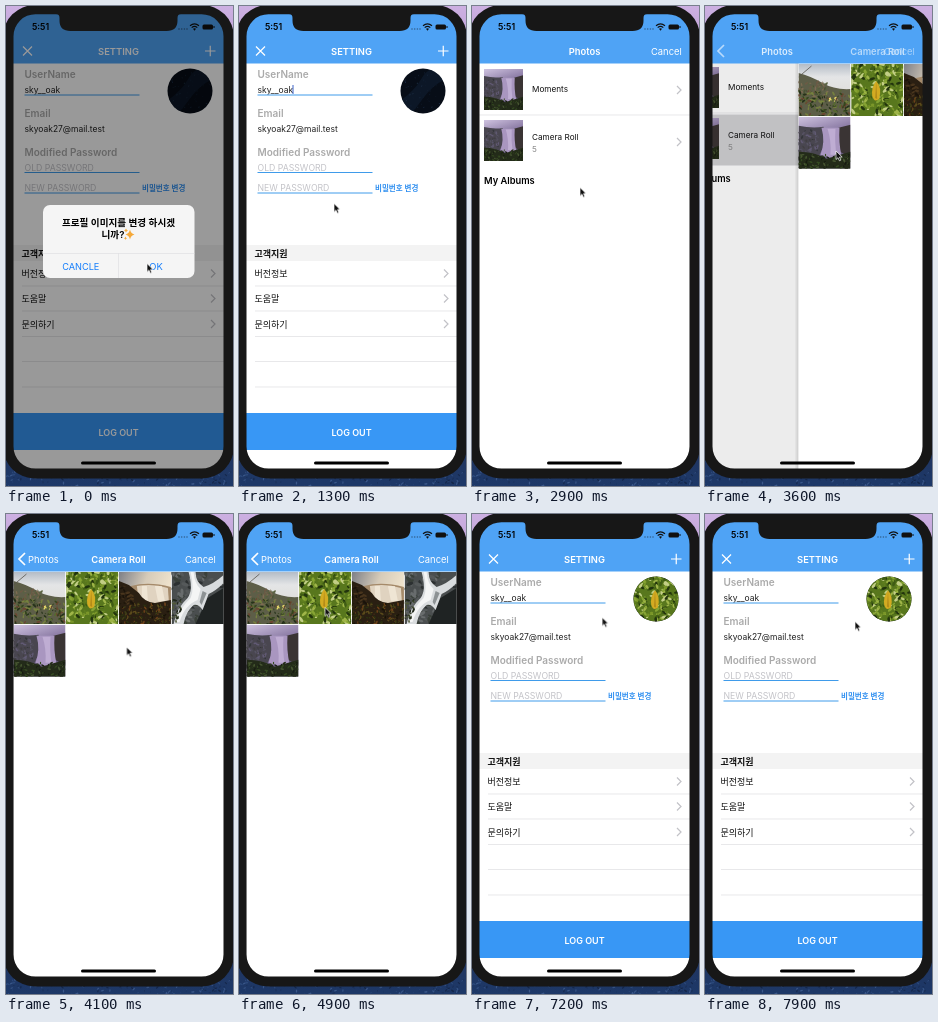
An HTML page for the animation above (8000 ms loop, 227x480 px).

```html
<!DOCTYPE html>
<html lang="ko">
<head>
<meta charset="utf-8">
<title>Profile settings</title>
<style>
  html, body { margin: 0; width: 100%; height: 100%; overflow: hidden; background: #1b315c; }
  svg { display: block; }
  text { font: 400 9px Inter, "Noto Sans CJK KR", "Noto Sans CJK", sans-serif; dominant-baseline: central; }
  .mid { text-anchor: middle; }
  .bold { font-weight: 600; }
  .nav text { fill: #fff; font-size: 9.4px; }
  .label { font-size: 10px; font-weight: 600; fill: #aaa; }
  .field { font-size: 8.5px; fill: #222; }
  .hint { font-size: 8.7px; fill: #c3c3c8; }
  .row { font-size: 9px; fill: #111; }
  .item { font-size: 8.2px; fill: #111; }
  .line { stroke: #3f9bea; stroke-width: 1; }
  .rule { stroke: #d9d9dc; stroke-width: .6; }
  .chev { fill: none; stroke: #c2c2c7; stroke-width: 1.2; }
  .icon { fill: none; stroke: #fff; stroke-width: 1.2; }
</style>
</head>
<body>
<svg id="stage" width="227" height="480" viewBox="0 0 227 480">
  <defs>
    <linearGradient id="wall" x2="0" y2="1">
      <stop offset="0" stop-color="#cdb0e2"/><stop offset=".4" stop-color="#77689f"/>
      <stop offset=".9" stop-color="#22345c"/><stop offset="1" stop-color="#1d3868"/>
    </linearGradient>
    <linearGradient id="haze" x2="0" y2="1">
      <stop offset="0" stop-color="#b4bcc6"/><stop offset=".25" stop-color="#e4e5e6"/><stop offset="1" stop-color="#d8d5cc"/>
    </linearGradient>
    <linearGradient id="dusk" x2="1" y2=".4">
      <stop offset="0" stop-color="#7d7f86"/><stop offset=".5" stop-color="#d6cbb9"/><stop offset="1" stop-color="#f2e6cf"/>
    </linearGradient>
    <linearGradient id="violet" x2=".3" y2="1">
      <stop offset="0" stop-color="#cfc3e0"/><stop offset=".4" stop-color="#8f7fa8"/><stop offset="1" stop-color="#5a5070"/>
    </linearGradient>
    <linearGradient id="edge">
      <stop offset="0" stop-color="#000" stop-opacity="0"/><stop offset="1" stop-color="#000" stop-opacity=".14"/>
    </linearGradient>
    <clipPath id="inside"><rect x="3" y="4" width="219" height="463" rx="24"/></clipPath>
    <clipPath id="disc"><circle cx="184" cy="85" r="22.5"/></clipPath>
  </defs>

  <rect width="227" height="480" fill="url(#wall)"/>
  <g id="specks"></g>

  <g clip-path="url(#inside)">
    <rect width="227" height="480" fill="#fff"/>

    <!-- settings -->
    <g>
      <rect width="227" height="57.5" fill="#4fa3f5"/>
      <g class="nav">
        <text class="mid bold" x="112.5" y="45">SETTING</text>
        <path class="icon" d="M17 40.5l9 9m0-9l-9 9M199 45h10.5m-5.25-5.25v10.5"/>
      </g>
      <text class="label" x="18.5" y="68">UserName</text>
      <text class="field" x="18.5" y="84">sky__oak</text>
      <rect id="caret" x="53.5" y="79" width="1" height="9" fill="#3c62c8"/>
      <text class="label" x="18.5" y="106.5">Email</text>
      <text class="field" x="18.5" y="123">skyoak27@mail.test</text>
      <text class="label" x="18.5" y="145.5">Modified Password</text>
      <text class="hint" x="18.5" y="161.5">OLD PASSWORD</text>
      <text class="hint" x="18.5" y="182">NEW PASSWORD</text>
      <path class="line" d="M18.5 89H133.5M18.5 166.5H133.5M18.5 187H133.5"/>
      <text class="bold" x="136" y="182" fill="#2f8ff0" style="font-size:7.5px">비밀번호 변경</text>
      <g clip-path="url(#disc)">
        <use href="#night" transform="translate(161 62) scale(.89)"/>
        <use id="chosen" href="#leaves" transform="translate(159 60) scale(.96)"/>
      </g>

      <rect y="239" width="227" height="16" fill="#f3f3f3"/>
      <text class="row bold" x="15.5" y="247.5">고객지원</text>
      <text class="row" x="15.5" y="267.5">버전정보</text>
      <text class="row" x="15.5" y="292.5">도움말</text>
      <text class="row" x="15.5" y="318">문의하기</text>
      <path class="rule" d="M16 280H218M16 305H218M16 330.5H218M16 355.5H218M16 381H218"/>
      <path class="chev" d="M205 263.5l4 4-4 4M205 288.5l4 4-4 4M205 314l4 4-4 4"/>
      <rect y="407" width="227" height="37" fill="#3897f5"/>
      <text class="mid bold" x="112.5" y="426" fill="#fff">LOG OUT</text>
    </g>

    <!-- photo picker -->
    <g id="picker">
      <rect width="227" height="480" fill="#fff"/>
      <g id="list">
        <g id="rows">
          <rect id="pressed" y="110.5" width="227" height="51" fill="#d0d0d3"/>
          <use href="#violetfall" transform="translate(12 63) scale(.75 .79)"/>
          <use href="#violetfall" transform="translate(12 114) scale(.75 .79)"/>
          <text class="item" x="60" y="83.3">Moments</text>
          <text class="item" x="60" y="130.7">Camera Roll</text>
          <text class="item" x="60" y="142.5" style="fill:#888">5</text>
          <path class="rule" d="M0 109H227"/>
          <path class="chev" d="M205 80l4 4-4 4M205 132l4 4-4 4"/>
          <text class="bold" x="12" y="174.5" style="font-size:9.3px">My Albums</text>
        </g>
        <rect id="shade" y="57" width="260" height="423" fill="#000"/>
      </g>
      <g id="grid">
        <rect x="3.5" y="57" width="4" height="423" fill="url(#edge)"/>
        <rect x="7.5" y="57" width="220" height="423" fill="#fff"/>
        <use href="#hill" x="7.5" y="58"/>
        <use href="#leaves" x="60.2" y="58"/>
        <use href="#sunfall" x="112.9" y="58"/>
        <use href="#greyfall" x="165.6" y="58"/>
        <use href="#violetfall" x="7.5" y="110.7"/>
      </g>
      <rect width="227" height="57.5" fill="#4fa3f5"/>
      <g class="nav">
        <g id="photosTitle"><text class="mid bold" x="112.5" y="45.3">Photos</text></g>
        <g id="backLabel"><text x="22" y="45">Photos</text></g>
        <path id="backArrow" class="icon" style="stroke-width:1.7" d="M19 39l-6 6 6 6"/>
        <g id="rollTitle"><text class="mid bold" x="112.5" y="45">Camera Roll</text></g>
        <g id="cancel"><text x="179" y="45">Cancel</text></g>
      </g>
    </g>

    <!-- status bar -->
    <text class="bold" x="26" y="21" style="font-size:8.7px">5:51</text>
    <g fill="#111">
      <g opacity=".45"><circle cx="173" cy="23" r=".8"/><circle cx="175.7" cy="23" r=".8"/><circle cx="178.4" cy="23" r=".8"/><circle cx="181" cy="23" r=".8"/></g>
      <path fill="none" stroke="#111" stroke-width="1.2" d="M184 19.700q4.500-3.800 9 0M185.700 21.600q2.800-2.300 5.600 0"/>
      <path d="M187 22.800q1.500-1 3 0l-1.500 1.900z"/>
      <rect x="196.5" y="18.5" width="10.5" height="5" rx="1.5"/><rect x="207.5" y="20" width="1" height="2"/>
    </g>
    <rect x="75" y="455.5" width="75" height="3" rx="1.5"/>

    <!-- confirmation -->
    <g id="alert">
      <rect width="227" height="480" opacity=".4"/>
      <rect x="37" y="199" width="151.5" height="73" rx="7" fill="#f5f5f5"/>
      <text class="mid bold" x="112.5" y="216" style="font-size:9.6px">프로필 이미지를 변경 하시겠</text>
      <text class="bold" x="95.5" y="228.5" style="font-size:9.6px">니까?</text>
      <path fill="#f5a93a" d="M124 223.500q.7 4 4.500 5-3.800 1-4.500 5-.7-4-4.500-5 3.800-1 4.500-5M120 222.500q.4 1.700 2 2-1.600.4-2 2-.4-1.600-2-2 1.600-.3 2-2M119.500 230.500q.3 1.500 1.700 1.800-1.400.3-1.700 1.800-.3-1.500-1.700-1.800 1.400-.3 1.700-1.800"/>
      <path d="M37 247.5H188.5M112.5 247.5V272" stroke="#dcdcdf" stroke-width=".6"/>
      <g fill="#157efb" class="mid">
        <text x="74.8" y="260.5" style="font-size:9.2px">CANCLE</text>
        <text x="150" y="260.5" style="font-size:9.4px">OK</text>
      </g>
    </g>
  </g>

  <!-- phone body with the screen cut out -->
  <path id="body" fill="#171717" fill-rule="evenodd"/>
  <path fill="#171717" d="M50 8h125q-3.500 0-3.500 4v2.500q0 10.500-11 10.500h-96q-11 0-11-10.500v-2.500q0-4-3.500-4z"/>

  <g id="cursor"><path fill="#111" stroke="#fff" stroke-width=".7" d="M0 0v8.500l2-1.800 1.400 3.100 1.500-.7-1.400-3 2.700-.1z"/></g>
</svg>

<script>
const LOOP = 8000;
const $ = id => document.getElementById(id);

const roundRect = (x, y, w, h, r) =>
  `M${x + r} ${y}h${w - 2 * r}a${r} ${r} 0 0 1 ${r} ${r}v${h - 2 * r}a${r} ${r} 0 0 1 ${-r} ${r}` +
  `h${2 * r - w}a${r} ${r} 0 0 1 ${-r} ${-r}v${2 * r - h}a${r} ${r} 0 0 1 ${r} ${-r}z`;
$('body').setAttribute('d', roundRect(-3, -1, 231, 473.5, 32) + roundRect(7.5, 8.2, 210, 454.4, 22));

// Seeded scatter of small tilted ellipses inside a box.
function scatter(seed, count, colors, [x, y, w, h], size) {
  const rnd = () => (seed = seed * 16807 % 2147483647) / 2147483647;
  let out = '';
  for (let i = 0; i < count; i++) {
    const cx = x + rnd() * w, cy = y + rnd() * h, r = size * (.4 + rnd());
    const fill = colors[Math.floor(rnd() * colors.length)];
    out += `<ellipse rx="${r}" ry="${r * .45}" fill="${fill}" transform="translate(${cx} ${cy}) rotate(${rnd() * 180})"/>`;
  }
  return out;
}
const base = fill => `<rect width="52" height="52" fill="${fill}"/>`;
const shape = (fill, d, extra = '') => `<path fill="${fill}" d="${d}" ${extra}/>`;

const photos = {
  hill: base('url(#haze)') +
    shape('#5d5e48', 'M0 9Q12 12 24 19T52 25V52H0z') +
    scatter(11, 110, ['#6d5a45', '#4a5235', '#7d6b52', '#5b6340'], [0, 18, 30, 18], 1.5) +
    scatter(23, 150, ['#34451d', '#57692f', '#76803f', '#26321a', '#6b4632'], [0, 27, 52, 25], 1.7) +
    scatter(5, 8, ['#e6d86a'], [31, 33, 9, 5], 1.3) +
    '<path d="M0 13L13 2" stroke="#59564f" stroke-width=".8"/>',
  leaves: base('#58771d') +
    scatter(31, 260, ['#3f5c14', '#7b9729', '#9fb548', '#c3cf86', '#5f7e1f', '#22340d', '#86a433'], [0, 0, 52, 52], 2.5) +
    shape('#d3ab22', 'M25 17Q31 23 28 35Q23 39 21 32Q20 23 25 17z') +
    shape('#b38a18', 'M25 18L26 35 24 34z'),
  sunfall: base('url(#dusk)') +
    shape('#a58a6a', 'M12 14Q30 9 52 15V32H12z') +
    shape('#e0d3c0', 'M18 14Q34 11 49 16L50 30Q34 33 20 30z') +
    shape('#f5ecdd', 'M23 14h5l1 15h-6zM36 14h7l3 15h-7z', 'opacity=".7"') +
    shape('#2a1f12', 'M0 9L10 13 20 21Q25 30 36 31L52 28V52H0z') +
    scatter(47, 150, ['#171207', '#3d3d17', '#5b4b1c', '#6f431a', '#2b3211'], [0, 31, 52, 21], 1.4) +
    scatter(53, 30, ['#1b140b', '#49351d', '#3a2a17'], [0, 14, 15, 20], 1.8),
  greyfall: base('#4a4e4f') +
    scatter(61, 90, ['#2c3031', '#686c6d', '#3a403a', '#55595a'], [0, 0, 52, 52], 3) +
    shape('#1f2323', 'M36 26L52 16V52H24z') +
    shape('#d9dcde', 'M17 0h7Q24 10 32 15Q42 12 52 3V11Q44 19 37 22L31 38Q27 32 22 33Q14 40 12 52H2Q5 36 16 26Q22 18 17 0z') +
    shape('#f4f5f5', 'M19 0h3Q23 12 29 17L26 28Q13 33 8 50H5Q8 36 19 26Q23 17 19 0z') +
    shape('#8d9294', 'M31 19L35 21 30 33 28 30z') +
    scatter(67, 28, ['#39432a', '#20271a', '#515a38'], [0, 28, 9, 22], 1.8),
  violetfall: base('url(#violet)') +
    shape('#494650', 'M0 9Q14 12 25 10L27 26 20 40 0 42z') +
    shape('#3a3434', 'M52 8L40 11 40 34 52 41z') +
    shape('#a996c0', 'M23 11H41Q40 26 43 39Q32 44 22 38Q27 25 23 11z') +
    shape('#cbbbdd', 'M29 12h8q-1 14 1 26h-6q1-14-3-26z', 'opacity=".65"') +
    scatter(83, 60, ['#34363a', '#565363', '#413f42', '#615a74'], [0, 14, 20, 22], 1.6) +
    shape('#232b19', 'M0 35Q16 35 28 42L52 35V52H0z') +
    scatter(89, 100, ['#354a21', '#161b10', '#465531', '#262e1a'], [0, 38, 52, 14], 1.6),
  night: base('#070d17') +
    shape('#101f33', 'M-5 40Q15 28 24 12T52 0V12Q36 20 26 34T8 56z', 'opacity=".6"') +
    scatter(97, 70, ['#15253c', '#0f1d30', '#22354f'], [4, 4, 44, 44], .7)
};
const defs = document.querySelector('defs');
for (const id in photos) {
  defs.innerHTML += `<symbol id="${id}" width="52" height="52" viewBox="0 0 52 52">${photos[id]}</symbol>`;
}
$('specks').innerHTML = scatter(7, 220, ['#2c4a7c', '#15274a', '#3a5789', '#1a3059'], [0, 455, 227, 25], 1.3);

// Stops are [time, value, easing to the next stop]; the last value holds.
const played = [];
function play(id, prop, stops) {
  const last = stops[stops.length - 1];
  const frames = [...stops, [LOOP, last[1]]].map(([t, value, easing = 'linear']) =>
    ({ offset: t / LOOP, [prop]: value, easing }));
  const a = $(id).animate(frames, { duration: LOOP, fill: 'both' });
  a.pause();
  played.push(a);
}
const at = (x, y = 0) => `translate(${x}px, ${y}px)`;
const glide = 'ease-in-out', settle = 'cubic-bezier(.2,.65,.35,1)';

play('alert', 'opacity', [[0, 1], [300, 1], [600, 0]]);
play('caret', 'opacity', [[0, 0], [600, 0], [600, 1], [1500, 1], [1900, 0]]);
play('chosen', 'opacity', [[0, 0], [6600, 0], [6600, 1]]);
play('picker', 'transform', [[0, at(0, 472)], [1500, at(0, 472), settle], [2000, at(0)],
  [6700, at(0), settle], [7200, at(0, 472)]]);

// Navigation push into the album.
const push = (id, prop, from, mid, to) =>
  play(id, prop, [[0, from], [3470, from], [3600, mid, settle], [3950, to]]);
push('list', 'transform', at(0), at(-37), at(-63));
push('shade', 'opacity', 0, .075, .1);
push('grid', 'transform', at(215), at(86), at(0));
push('photosTitle', 'transform', at(0), at(-40.5), at(-75));
push('photosTitle', 'opacity', 1, .8, 0);
push('backLabel', 'transform', at(75), at(34.5), at(0));
push('backLabel', 'opacity', 0, 0, 1);
push('backArrow', 'opacity', 0, .6, 1);
push('rollTitle', 'transform', at(147), at(60), at(0));
push('rollTitle', 'opacity', 0, .6, 1);
push('cancel', 'opacity', 1, .5, 1);
play('rows', 'transform', [[0, at(0)], [3200, at(0)], [3400, at(0, -2)]]);
play('pressed', 'opacity', [[0, 0], [3400, 0], [3400, 1]]);

play('cursor', 'transform', [
  [0, at(141, 257.5)], [400, at(141, 257.5), glide], [1200, at(95, 197.5)],
  [2000, at(95, 197.5), glide], [2700, at(108, 181.5)],
  [2900, at(108, 181.5), glide], [3300, at(131, 145)],
  [3800, at(131, 145), glide], [4700, at(86, 93.5)],
  [5200, at(86, 93.5), glide], [6200, at(101, 97.5)],
  [6700, at(101, 97.5), glide], [7600, at(150, 107.5)]
]);

const start = performance.now();
function tick() {
  const t = (performance.now() - start + 5) % LOOP;
  const step = Math.floor(t / 100) * 100;
  for (const a of played) a.currentTime = step;
  requestAnimationFrame(tick);
}
tick();
</script>
</body>
</html>
```
